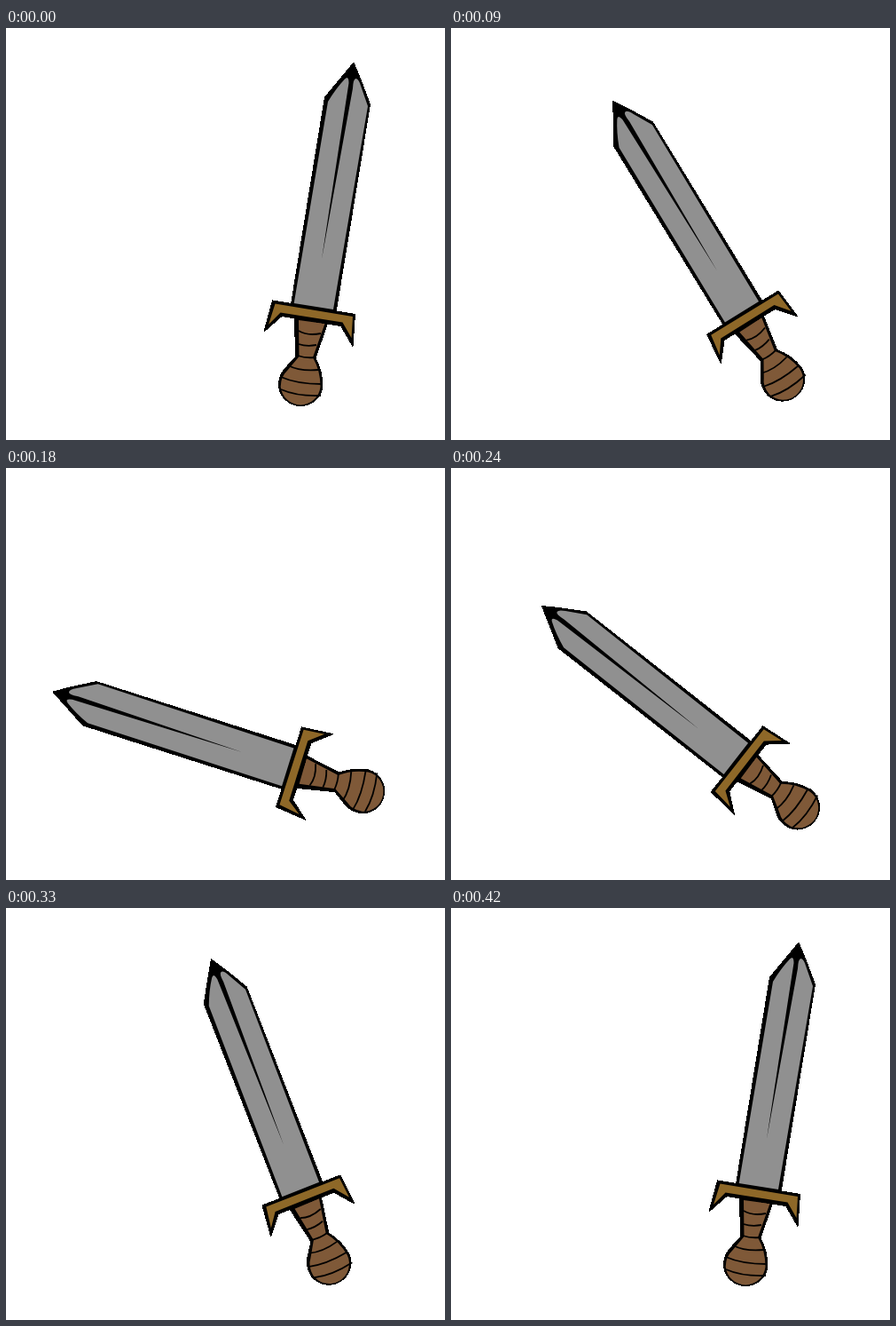
Animation of 495x464 px, one loop 450 ms. Source, as an HTML page:

```html
<!DOCTYPE html>
<html lang="en">
<head>
<meta charset="utf-8">
<title>Sword swing</title>
<style>
  html, body { margin: 0; width: 100%; height: 100%; overflow: hidden; background: #fff; }
  svg { display: block; width: 495px; height: 464px; }
  .edge { stroke: #000; stroke-width: 1; stroke-linejoin: round; shape-rendering: crispEdges; }
  .steel { fill: #909090; }
  .wood { fill: #7f5938; }
  .brass { fill: #8e6828; }
  .bands { fill: none; stroke: #000; stroke-width: 1.8; }
</style>
</head>
<body>
<svg viewBox="0 0 495 464">
  <g id="sword">
    <!-- grip and pommel -->
    <path class="edge" d="M325 326 L363 331 L349 372 Q357 386 357 404 A25 25 0 0 1 307.5 404 Q307.5 391 314 384 L327 370 Z"/>
    <path class="wood" d="M330 329 L359.5 333 L346 371 Q354.5 386 354.5 404 A22.5 22.5 0 0 1 309.7 404 Q310 392 317 386 L330.5 370 Z"/>
    <path class="bands" d="M330 341 Q340 347 355 344 M330 356 Q339 359 350 357 M329 369 Q338 372 348 371
      M318 380 Q332 387 352 385 M310 393 Q328 401 356 401 M310 407 Q328 415 355 414"/>
    <!-- blade -->
    <path class="edge" d="M392 39 L400 58 L410.5 86 L372 320 L321.5 311 L359.5 78 Z"/>
    <path class="steel" d="M363 83 Q372 68 382 57.5 Q386.5 53 386.5 62 L356 260 L391 68 Q391.5 57 394.5 57 Q397.5 57 400 65 L408 88 L369 317 L324.7 310 Z"/>
    <!-- guard -->
    <path class="edge" d="M300.5 307 L393.5 322.5 L391 358.5 L377.5 335.5 L311 324.5 L291 342 Z"/>
    <path class="brass" d="M303.5 310.5 L391 325 L389.5 349 L379.5 331.5 L309.5 320.5 L296 334 Z"/>
  </g>
</svg>
<script>
  const sword = document.getElementById('sword');
  const STEP = 30, STEPS = 15, DOWN = 6, UP = 8, SWING = -81.6;

  // Fast swing down, slower return, one step of rest.
  function angleAt(ms) {
    const i = Math.floor((ms + 0.01) / STEP) % STEPS;
    return SWING * (i <= DOWN ? i / DOWN : (DOWN + UP - i) / UP);
  }

  function draw() {
    sword.setAttribute('transform', `rotate(${angleAt(performance.now())} 345.8 342)`);
    requestAnimationFrame(draw);
  }
  draw();
</script>
</body>
</html>
```
